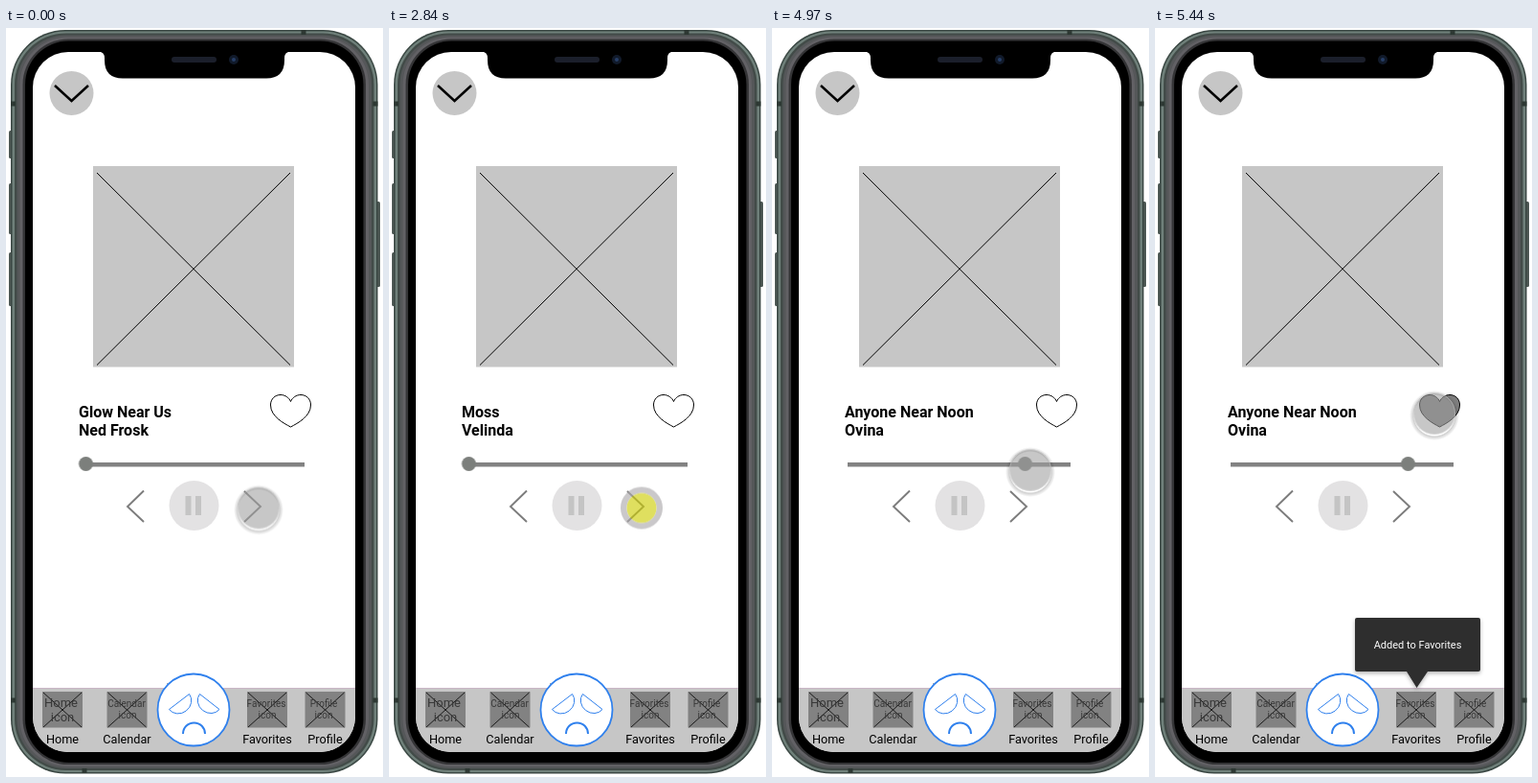
An HTML page for the animation above (6.81 s loop, 394 px wide and 781 px high).

```html
<!DOCTYPE html>
<html lang="en">
<head>
<meta charset="utf-8">
<title>Music player prototype</title>
<style>
  html, body { margin: 0; width: 100%; height: 100%; overflow: hidden; background: #fff; }
  svg { display: block; width: 100vw; height: 100vh; font-family: Roboto, Arial, sans-serif; }
  .line { fill: none; stroke: #000; }
  .gray { fill: #c6c6c6; }
  .song { font-size: 16px; font-weight: 700; }
  .nav { font-size: 12.7px; text-anchor: middle; }
  .icon { font-size: 10px; fill: #383838; text-anchor: middle; }
  .mood { fill: #fff; stroke: #2f80ed; }

  .song, .knob, .cursor, .press, .heart, .toast {
    animation: 6810ms step-end infinite;
  }
  .one { animation-name: one; }
  .two { animation-name: two; }
  .three { animation-name: three; }
  .knob { animation-name: knob; }
  .cursor { animation-name: move, release; }
  .press { animation-name: move, press; }
  .heart { animation-name: like; }
  .toast { animation-name: toast; }

  @keyframes one { 0% { opacity: 1 } 23.78%, 100% { opacity: 0 } }
  @keyframes two { 0% { opacity: 0 } 23.78% { opacity: 1 } 42.87%, 100% { opacity: 0 } }
  @keyframes three { 0% { opacity: 0 } 42.87%, 100% { opacity: 1 } }
  @keyframes knob {
    0% { transform: translateX(83.5px) }
    42.87%, 100% { transform: translateX(264.5px) }
  }
  @keyframes move {
    0% { transform: translate(264px, 500.5px) }
    50.8% { transform: translate(262.5px, 499.5px) }
    70.77% { transform: translate(265px, 482px) }
    71.95% { transform: translate(270px, 461px) }
    73.12% { transform: translate(277px, 435px) }
    74.3% { transform: translate(283px, 416px) }
    75.47% { transform: translate(287px, 406px) }
    76.5% { transform: translate(290px, 402.5px) }
    77.53% { transform: translate(291.5px, 402px) }
    78.7%, 100% { transform: translate(292px, 402px) }
  }
  @keyframes press {
    0%, 23.78%, 42.87%, 79.88%, 100% { opacity: 0 }
    22.6%, 41.69%, 78.7% { opacity: .64 }
  }
  @keyframes release {
    0%, 23.78%, 42.87%, 79.88%, 100% { opacity: 1 }
    22.6%, 41.69%, 78.7% { opacity: 0 }
  }
  @keyframes like { 0% { fill: #fff } 79.88%, 100% { fill: #7d7d7d } }
  @keyframes toast { 0% { opacity: 0 } 79.88%, 100% { opacity: 1 } }
</style>
</head>
<body>
<svg viewBox="0 0 394 781" preserveAspectRatio="none">
  <defs>
    <clipPath id="screen"><rect x="28" y="25" width="337" height="730" rx="37"/></clipPath>
    <radialGradient id="shade">
      <stop offset=".8" stop-opacity="0"/>
      <stop offset=".85" stop-opacity=".18"/>
      <stop offset="1" stop-opacity="0"/>
    </radialGradient>
    <filter id="drop" x="-10%" y="-10%" width="120%" height="130%">
      <feDropShadow dx="0" dy="2" stdDeviation="2" flood-opacity=".3"/>
    </filter>
    <g id="tile">
      <rect width="42" height="37.5" fill="#828282"/>
      <path class="line" stroke-width=".8" d="M1 1 41 37M41 1 1 37"/>
    </g>
  </defs>

  <!-- phone body -->
  <g fill="#4c5753">
    <rect x="3" y="107" width="5" height="29" rx="1.5"/>
    <rect x="3" y="162" width="5" height="53" rx="1.5"/>
    <rect x="3" y="234" width="5" height="56" rx="1.5"/>
    <rect x="386" y="181" width="5" height="89" rx="1.5"/>
  </g>
  <rect x="5" y="2" width="383.500" height="775.500" rx="57" fill="#3a4743"/>
  <rect x="6.500" y="3.500" width="380.500" height="772.500" rx="55.500" fill="#6f807a"/>
  <rect x="9" y="5.500" width="375.500" height="768.500" rx="53.500" fill="#424b48"/>
  <rect x="11.500" y="7.500" width="370.500" height="764.500" rx="51.500" fill="#555759"/>
  <rect x="14.500" y="9.500" width="364.500" height="760.500" rx="49.500" fill="#626165"/>
  <rect x="17.500" y="11.500" width="358.500" height="756.500" rx="47.500" fill="#343436"/>
  <rect x="20" y="13.500" width="353.500" height="752.500" rx="45.500"/>
  <path stroke="#2d3833" stroke-width="5" d="M5 79h5M5 701h5M383.500 79h5M383.500 701h5M311 2v5M82 772v5"/>
  <rect x="28" y="25" width="337" height="730" rx="37" fill="#fff"/>
  <path d="M97 24.500q6 .5 6 7v2q0 19 19 19h150q19 0 19-19v-2q0-6.500 6-7z"/>
  <rect x="173" y="30" width="47" height="6" rx="3" fill="#1b1f2b"/>
  <circle cx="238" cy="33" r="5" fill="#111a2a"/>
  <circle cx="238" cy="33" r="2" fill="#263d66"/>

  <!-- player -->
  <circle class="gray" cx="68.500" cy="68" r="23"/>
  <path class="line" stroke-width="2.500" d="M51 60 68.500 76 86 60"/>
  <rect class="gray" x="91" y="144" width="210" height="209.500"/>
  <path class="line" d="M95 151 297 351.500M297 151 95 351.500"/>

  <g class="song one"><text x="76" y="406">Glow Near Us</text><text x="76" y="425">Ned Frosk</text></g>
  <g class="song two"><text x="76" y="406">Moss</text><text x="76" y="425">Velinda</text></g>
  <g class="song three"><text x="76" y="406">Anyone Near Noon</text><text x="76" y="425">Ovina</text></g>

  <path class="heart" stroke="#000" d="M297.500 416C290 412 276.500 405 276.500 393C276.500 387 281 382.500 287 382.500C291.500 382.500 296 385.500 297.500 389.500C299 385.500 303.500 382.500 308 382.500C314 382.500 318.500 387 318.500 393C318.500 405 305 412 297.500 416Z"/>

  <rect x="79" y="453" width="233" height="4.500" fill="#828282"/>
  <circle class="knob" cy="454.500" r="7.500" fill="#7c7f7c"/>
  <path fill="none" stroke="#7c7c7c" stroke-width="1.900" d="M144 482.500 127 499 144 515M249 483 266 499 249 515"/>
  <circle cx="196.500" cy="498" r="26" fill="#e3e2e3"/>
  <path fill="#c4c4c4" d="M187.500 488h6v20h-6zM198 488h6v20h-6z"/>

  <!-- tab bar -->
  <g clip-path="url(#screen)">
    <rect class="gray" x="28" y="688" width="337" height="68"/>
    <path stroke="#c9b6c6" d="M28 688.500h337"/>
  </g>
  <use href="#tile" x="38" y="692"/>
  <use href="#tile" x="105.500" y="692"/>
  <use href="#tile" x="252" y="692"/>
  <use href="#tile" x="312.500" y="692"/>
  <g class="icon">
    <g font-size="13"><text x="57.500" y="708">Home</text><text x="59" y="723">icon</text></g>
    <text x="126" y="708">Calendar</text><text x="127" y="720">icon</text>
    <text x="272" y="708">Favorites</text><text x="273" y="720">icon</text>
    <text x="332" y="708">Profile</text><text x="332" y="720">icon</text>
  </g>
  <g class="nav">
    <text x="59" y="746">Home</text>
    <text x="126.500" y="746">Calendar</text>
    <text x="273" y="746">Favorites</text>
    <text x="333.500" y="746">Profile</text>
  </g>
  <path stroke="#777" stroke-width=".8" d="M168 683.500 171 685"/>
  <g class="mood">
    <circle cx="196" cy="711" r="37.500" stroke-width="1.800"/>
    <path d="M170.500 710.500 191.500 694.500A13.200 12 -37 0 1 170.500 710.500ZM202.500 694.500 223 710.500A13 11.500 37 0 1 202.500 694.500Z"/>
    <path fill="none" stroke-width="2" d="M185 736C185 729.500 190 724.500 196.500 724.500S208 729.500 208 736"/>
  </g>

  <g class="toast">
    <path filter="url(#drop)" fill="#2d2d2d" d="M211 615h127q2 0 2 2v52q0 2-2 2h-53l-11.500 17-10.500-17h-52q-2 0-2-2v-52q0-2 2-2z"/>
    <text x="274.500" y="647" font-size="11" fill="#fff" text-anchor="middle">Added to Favorites</text>
  </g>

  <!-- touch pointer -->
  <g class="cursor">
    <circle cy="2" r="26" fill="url(#shade)"/>
    <circle r="22" fill="#9f9f9f" fill-opacity=".58"/>
    <circle r="21.500" fill="none" stroke="#fff" stroke-opacity=".3"/>
  </g>
  <g class="press">
    <circle r="18.750" fill="none" stroke="#acaaac" stroke-width="6.500"/>
    <circle r="15.500" fill="#cdcd05"/>
  </g>
</svg>
</body>
</html>
```
